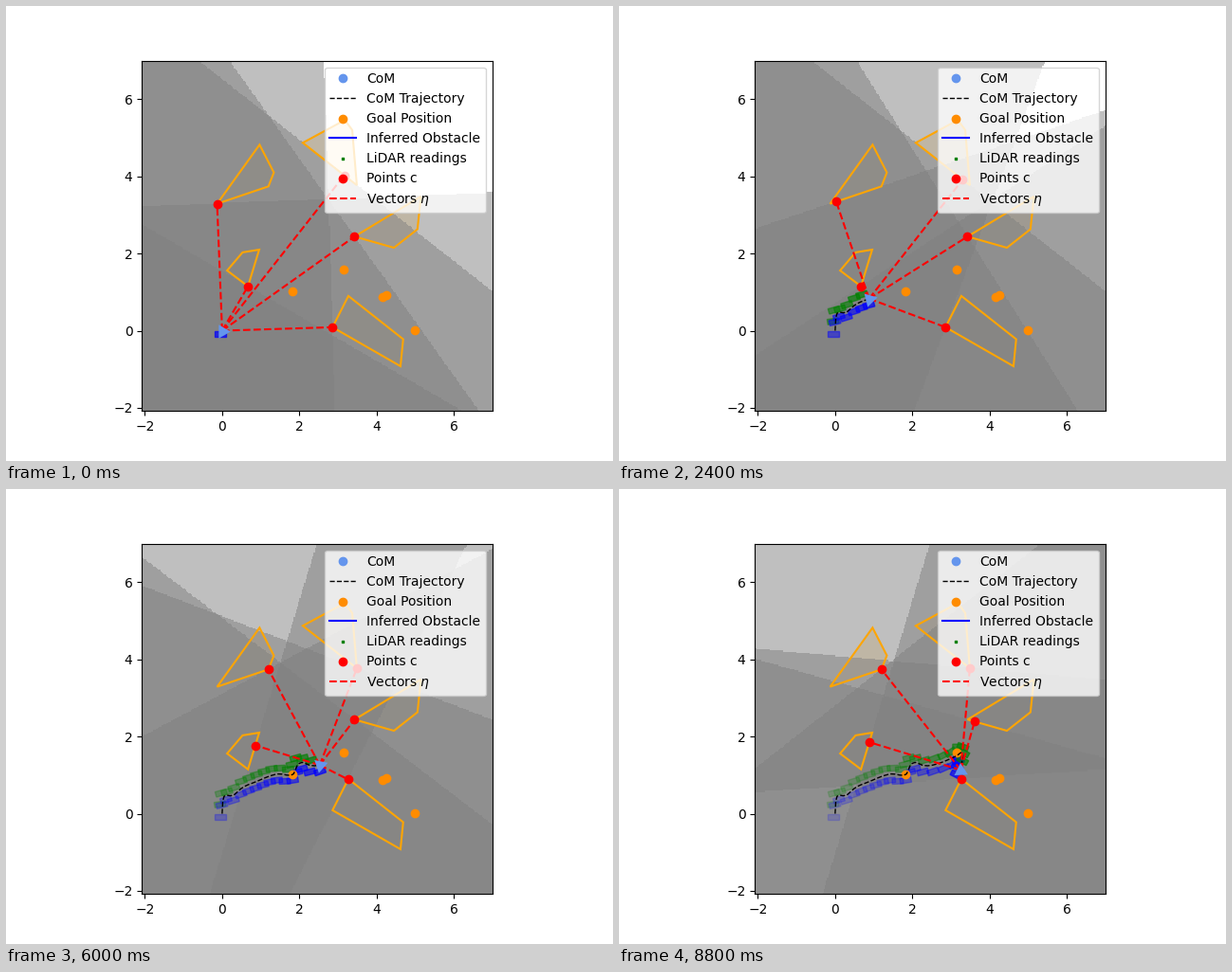
Animation of 640x480 px, one loop 9000 ms. Source, as a matplotlib script:

```python
import numpy as np
import matplotlib.pyplot as plt
from matplotlib.animation import FuncAnimation
from matplotlib.patches import Polygon

FRAMES, INTERVAL = 45, 200
LOW, HIGH = -2.08, 7.0
GRID = 300
REACH = 0.12       # distance at which a goal counts as reached
TURN_RATE = 0.3    # share of the heading error corrected per step

OBSTACLES = [np.array(p) for p in (
    [(-0.13, 3.29), (0.97, 4.82), (1.34, 4.10), (1.20, 3.74)],
    [(0.13, 1.56), (0.53, 2.03), (0.96, 2.10), (0.67, 1.15)],
    [(2.86, 0.09), (3.27, 0.90), (4.69, -0.22), (4.62, -0.92)],
    [(3.43, 2.44), (4.45, 2.15), (5.06, 2.63), (5.15, 3.48)],
    [(2.09, 4.87), (3.18, 5.46), (3.37, 5.20), (3.49, 3.77)],
)]
GOALS = np.array([(1.83, 1.02), (3.16, 1.58), (4.15, 0.87),
                  (4.25, 0.92), (5.0, 0.02)])

# Key points of the walk: step, x, y
WALK = np.array([
    (0, 0, 0), (3, .05, .45), (6, .30, .48), (8, .49, .65), (12, .88, .83),
    (18, 1.45, 1.03), (22, 1.85, 1.03), (24, 1.94, 1.24), (26, 2.07, 1.33),
    (28, 2.28, 1.25), (35, 3.125, 1.49), (38, 3.28, 1.59), (44, 3.255, 1.13)])


def smooth_path(keys, t):
    """Cubic Hermite curve through rows of (time, x, y)."""
    times, pts = keys[:, 0], keys[:, 1:]
    slopes = np.gradient(pts, times, axis=0)
    i = np.clip(np.searchsorted(times, t, side="right") - 1, 0, len(times) - 2)
    span = (times[i + 1] - times[i])[:, None]
    u = (t - times[i])[:, None] / span
    ease = u * u * (3 - 2 * u)
    return (pts[i] * (1 - ease) + pts[i + 1] * ease
            + span * u * (1 - u) * ((1 - u) * slopes[i] - u * slopes[i + 1]))


def face_goals(path):
    """Heading at each step, turning smoothly toward the next unreached goal."""
    angle, goal, result = 0.0, 0, []
    for p in path:
        result.append(angle)
        if np.hypot(*(GOALS[goal] - p)) < REACH:
            goal += 1
        dx, dy = GOALS[goal] - p
        angle += TURN_RATE * (np.arctan2(dy, dx) - angle)
    return result


def closest_point(poly, p):
    """Nearest point to p on the outline of poly."""
    edge = np.roll(poly, -1, axis=0) - poly
    t = np.sum((p - poly) * edge, axis=1) / np.sum(edge ** 2, axis=1)
    near = poly + np.clip(t, 0, 1)[:, None] * edge
    return near[np.argmin(np.sum((near - p) ** 2, axis=1))]


def foot_corners(k):
    """Rectangle of the foot set down at step k; even steps are the right foot."""
    ahead = np.array([np.cos(heading[k]), np.sin(heading[k])])
    left = np.array([-ahead[1], ahead[0]])
    side = -1 if k % 2 == 0 else 1
    gap = 0.08 * (1 + min(k / 10, 1))
    center = com[k] - 0.05 * ahead + side * gap * left
    return [center + 0.145 * i * ahead + 0.07 * j * left
            for i, j in ((1, 1), (-1, 1), (-1, -1), (1, -1))]


com = smooth_path(WALK, np.arange(FRAMES))
heading = face_goals(com)

fig, ax = plt.subplots(figsize=(6.4, 4.8), dpi=100)
ax.set_aspect("equal")

cell = (HIGH - LOW) / GRID
axis = LOW + cell * (np.arange(GRID) + 0.5)
gx, gy = np.meshgrid(axis, axis)
shade = np.full((GRID, GRID, 4), 0.5)
region = ax.imshow(shade, extent=(LOW, HIGH, LOW, HIGH), origin="lower",
                   interpolation="nearest", zorder=0)

for poly in OBSTACLES:
    ax.add_patch(Polygon(poly, fc="orange", ec="none", alpha=0.2, zorder=-1))
    ax.add_patch(Polygon(poly, fill=False, ec="orange", lw=1.5, zorder=1))

feet = [ax.add_patch(Polygon(foot_corners(k), lw=1, zorder=1.5,
                             color="blue" if k % 2 == 0 else "green"))
        for k in range(FRAMES)]

goals = ax.scatter(*GOALS.T, color="darkorange", zorder=2)
trail, = ax.plot([], [], "k--", lw=1, zorder=2.1)
vectors = [ax.plot([], [], "r--", zorder=2.2)[0] for _ in OBSTACLES]
points = ax.scatter([], [], color="red", zorder=2.3)
robot, = ax.plot([], [], ls="none", color="cornflowerblue", ms=12, mew=0,
                 zorder=2.4)

# Handles that only appear in the legend
dot, = ax.plot([], [], "o", color="cornflowerblue")
wall, = ax.plot([], [], color="blue")
lidar = ax.scatter([], [], s=1, marker="s", color="green")
legend = ax.legend(
    [dot, trail, goals, wall, lidar, points, vectors[0]],
    ["CoM", "CoM Trajectory", "Goal Position", "Inferred Obstacle",
     "LiDAR readings", "Points c", r"Vectors $\eta$"], loc="upper right")
legend.set_zorder(5)

ax.set_xlim(LOW, HIGH)
ax.set_ylim(LOW, HIGH)


def draw(n):
    p = com[n]
    near = np.array([closest_point(poly, p) for poly in OBSTACLES])

    # Each safe half-plane adds one half-transparent grey layer
    layers = np.zeros((GRID, GRID))
    for c, line in zip(near, vectors):
        eta = c - p
        layers += eta[0] * (gx - c[0]) + eta[1] * (gy - c[1]) <= 0
        line.set_data([p[0], c[0]], [p[1], c[1]])
    shade[..., 3] = 1 - 0.5 ** layers
    region.set_data(shade)

    for k, foot in enumerate(feet):
        foot.set_visible(k <= n)
        foot.set_alpha(0.7 * np.exp(-max(n - k, 0) / 30))

    trail.set_data(*com[:n + 1].T)
    points.set_offsets(near)
    robot.set_data([p[0]], [p[1]])
    robot.set_marker((3, 0, np.degrees(heading[n]) - 90))
    return [region, trail, points, robot, *vectors, *feet]


anim = FuncAnimation(fig, draw, frames=FRAMES, interval=INTERVAL,
                     repeat=True, repeat_delay=0, blit=False)
plt.show()
```
